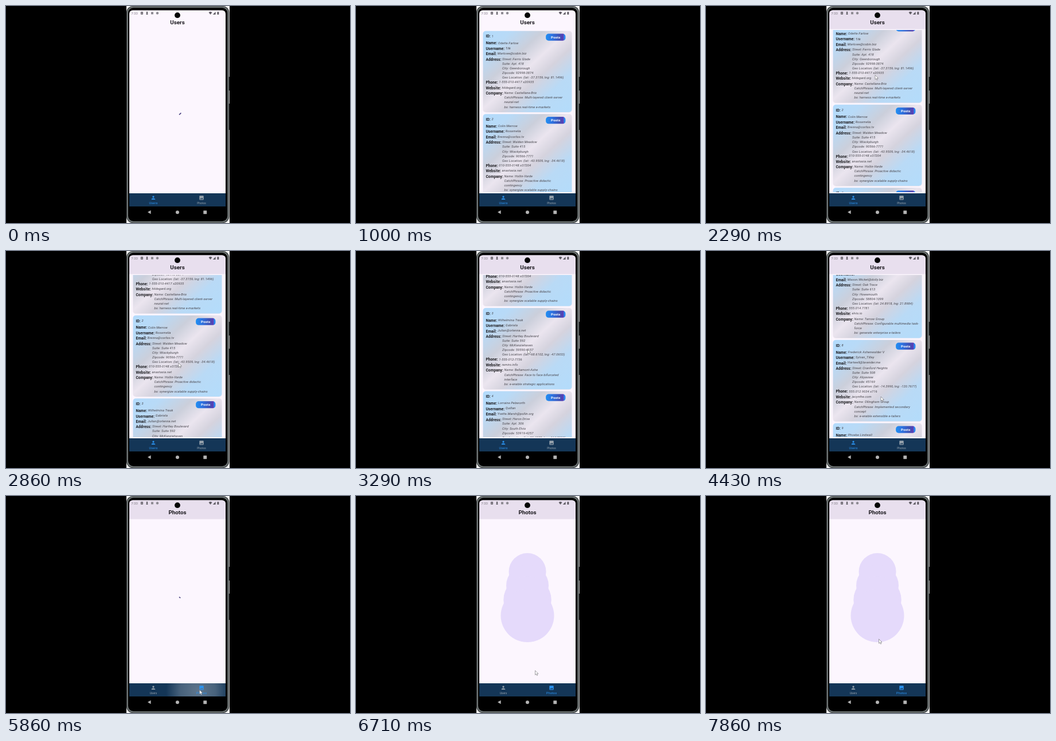
Animation, 600 px wide and 380 px high, one loop 8 s. Source, as an HTML page:

```html
<!DOCTYPE html>
<html lang="en">
<head>
<meta charset="utf-8">
<title>Users and photos</title>
<style>
  html, body { margin: 0; width: 100%; height: 100%; overflow: hidden; background: #000; }
  #stage { position: relative; width: 600px; height: 380px; overflow: hidden; background: #000;
    font-family: Roboto, "Open Sans", sans-serif; }
  svg { position: absolute; left: 0; top: 0; }
  .title { font-weight: 700; font-size: 9.8px; fill: #1a181d; text-anchor: middle; }
  .tab text { text-anchor: middle; letter-spacing: .05px; }
  #view { position: absolute; left: 215px; top: 42px; width: 168px; height: 284px; overflow: hidden; }
  /* The list is laid out in device pixels, then scaled down. */
  #list { position: absolute; left: 0; top: 0; width: 411px; transform-origin: 0 0; }
  .card { position: relative; box-sizing: border-box; height: 348.2px; margin: 4px 16px 8px; padding: 12px;
    border-radius: 12px; white-space: nowrap; color: #45434a; font-size: 14px; line-height: 20px;
    letter-spacing: .25px; box-shadow: 0 1px 3px rgba(0, 0, 0, .1);
    background: linear-gradient(to bottom right, #b3dbfc 0%, #b8daf7 16%, #cbcfdb 34%, #ebe5ef 48%,
      #d5d3de 60%, #b9daf6 76%, #b3dcfb 100%); }
  .row { display: flex; min-height: 23px; font-style: italic; }
  .row:first-child { height: 29.2px; }
  .row b { font-size: 16px; font-weight: 600; line-height: 23px; font-style: normal; color: #1c1b1f; margin-right: 4px; }
  .row span { margin-top: -.5px; }
  .posts { position: absolute; right: 27px; top: 12px; width: 84px; height: 30px; border-radius: 12px;
    color: #fff; font-size: 15px; font-weight: 600; line-height: 30px; text-align: center;
    background: linear-gradient(90deg, #2190f2 0%, #2d74e2 30%, #3f51b5 70%, #5f3db4 90%, #2b88f0 92%); }
</style>
</head>
<body>
<div id="stage">
  <svg width="600" height="380" viewBox="0 0 600 380">
    <defs>
      <clipPath id="screen"><path d="M215 351V13.500a6 6 0 0 1 6-6H377a6 6 0 0 1 6 6V351Z"/></clipPath>
      <clipPath id="bar"><rect x="215" y="328" width="168" height="23"/></clipPath>
      <radialGradient id="glow">
        <stop offset="0" stop-color="#fff" stop-opacity=".32"/>
        <stop offset=".55" stop-color="#fff" stop-opacity=".22"/>
        <stop offset="1" stop-color="#fff" stop-opacity="0"/>
      </radialGradient>
    </defs>

    <rect x="210" width="180" height="380" fill="#f4f4f4"/>
    <path d="M388 124h2v24h-2zM388 171h2v46h-2z" fill="#1b1d1e"/>
    <rect x="210" y="0" width="179.300" height="380" rx="11.500" fill="#3a3e3f"/>
    <rect x="211.900" y="1.900" width="175.400" height="376.200" rx="10.500" fill="#000" stroke="#6c7272" stroke-width="2.200"/>

    <g clip-path="url(#screen)">
      <rect x="215" y="7" width="168" height="344" fill="#fcf6fe"/>
      <rect id="head" x="215" y="7" width="168" height="33.500" fill="#e8dfee"/>
    </g>
    <circle cx="299" cy="16.200" r="4.900" fill="#050505"/>
    <text id="title" class="title" x="299" y="32"></text>

    <text x="218.500" y="14.700" font-size="5.800" fill="#77737c">7:33</text>
    <g fill="#5d5a62">
      <path d="M235 10.300h4v4.400h-4zM236.300 11.700v1.600h1.400v-1.600z" fill-rule="evenodd"/>
      <path d="M244.800 10h2.400v2h-.5v1h.7v2h-2.800v-2h.7v-1h-.5z"/>
      <rect x="253" y="10.500" width="4" height="4" fill="#8b8890"/>
      <circle cx="264" cy="12.500" r="2.200" fill="#8b8890"/>
      <path d="M353.600 11.200Q356.500 8.900 359.400 11.200L356.500 15ZM360.800 15H365.600V10.100ZM368.400 10.600h.7v-.7h1.500v.7h.7v4.400h-2.900z"/>
    </g>

    <path id="spin" fill="none" stroke="#493f80" stroke-width="1.640"/>
    <g id="blob" fill="#e5dafb">
      <circle cx="299" cy="132.500" r="32.500"/>
      <circle cx="299" cy="157" r="37"/>
      <circle cx="299" cy="182" r="41.700"/>
      <circle cx="299" cy="209.500" r="46.500"/>
    </g>

    <rect x="215" y="328" width="168" height="23" fill="#143657"/>
    <g clip-path="url(#bar)"><circle id="ripple" cx="335" cy="342" fill="url(#glow)"/></g>
    <g class="tab" id="usersTab">
      <path transform="translate(252.100 330.900) scale(.409)" d="M12 12a4 4 0 1 0 0-8 4 4 0 0 0 0 8zm0 2c-2.670 0-8 1.340-8 4v2h16v-2c0-2.660-5.330-4-8-4z"/>
      <text x="257" y="346.500">Users</text>
    </g>
    <g class="tab" id="photosTab">
      <path transform="translate(336.100 330.900) scale(.409)" d="M21 19V5c0-1.100-.9-2-2-2H5c-1.100 0-2 .9-2 2v14c0 1.100.9 2 2 2h14c1.100 0 2-.9 2-2zM8.500 13.500l2.500 3 3.500-4.500 4.500 6H5z"/>
      <text x="341" y="346.500">Photos</text>
    </g>
    <g fill="#b4b4b4">
      <path d="M247 361l5.600-3.300v6.600z"/>
      <circle cx="299" cy="361.200" r="3"/>
      <rect x="344.300" y="358.300" width="5.900" height="5.900" rx=".5"/>
    </g>
  </svg>

  <div id="view"><div id="list"></div></div>

  <svg width="600" height="380" viewBox="0 0 600 380">
    <path id="cursor" d="M0 0V7.600L1.800 6 3 8.700 4.300 8.100 3.100 5.500H5.500Z" fill="#fff" stroke="#66656b" stroke-width=".6"/>
  </svg>
</div>

<script>
const LOOP = 8000, FPS = 7, SCALE = 168 / 411;
const $ = id => document.getElementById(id);

// name; username; email; street; suite; city; zip; lat; lng; phone; site; company; phrase; bs
const users = `
Odette Farlow;Tilk;Marlowe@cobin.biz;Ferris Glade;Apt. 418;Gwenborough;92998-3874;-37.3159;81.1496;1-555-010-4417 x20935;hildegard.org;Castellane-Brix;Multi-layered client-server|neural-net;harness real-time e-markets
Colin Merrow;Rosamelia;Brenna@corliss.tv;Walden Meadow;Suite 415;Wisokyburgh;90566-7771;-43.9509;-34.4618;010-555-0148 x37204;anastasia.net;Hollin-Varde;Proactive didactic|contingency;synergize scalable supply-chains
Wilhelmina Trask;Gabriela;Julian@orlenna.net;Hartley Boulevard;Suite 592;McKenziehaven;59590-4157;-68.6102;-47.0653;1-555-012-7736;ramiro.info;Bellamont-Ashe;Face to face bifurcated|interface;e-enable strategic applications
Lorraine Pebworth;Quillan;Yvette.Marsh@pollin.org;Heron Drive;Apt. 306;South Elvis;53919-4257;29.4572;-164.2990;555-014-9920 x118;kale.biz;Marsden-Cole;Multi-tiered zero tolerance|productivity;transition cutting-edge web services
Meredith Hansell;Torvin;Basil_Winterton@coral.ca;Alder Bridge;Suite 264;Roscoeview;33263;-31.8129;62.5342;(555)010-3862;demarco.info;Wendlow LLC;User-centric fault-tolerant|solution;revolutionize end-to-end systems
Mrs. Martin Colbrook;Fernando_Whitlow;Sidney_Holt@marble.info;Bartram Crossing;Apt. 721;South Christy;23505-1337;-71.4197;71.7478;1-555-013-2290 x5817;ola.org;Pemberly-Strander;Synchronised bottom-line|interface;e-enable innovative applications
Gordon Ellwicke;Alden.Porter;Mason.Wicket@dolly.biz;Oak Trace;Suite 613;Howemouth;58804-1099;24.8918;21.8984;555.014.7781;elvis.io;Tarrow Group;Configurable multimedia task-|force;generate enterprise e-tailers
Frederick Ashenwalder V;Sylvan_Tilley;Hartwell@lavender.me;Cranford Heights;Suite 508;Aliyaview;45169;-14.3990;-120.7677;555.012.9034 x716;jacynthe.com;Ollingham Group;Implemented secondary|concept;e-enable extensible e-tailers
Phoebe Lindwall;Stanmore;Corin_Oakes@melba.io;Willow Park;Suite 197;Bartholomebury;76495-3109;24.6463;-168.8889;(555)011-6208 x4135;conrad.com;Hadley and Sons;Switchable contextually-based|project;aggregate real-time technologies
Clarissa Dunmore;Merrick.Vale;Ansel.Brook@tully.biz;Linden Square;Suite 830;Lebsackbury;31428-2261;-38.2386;57.2232;555-016-3804;ambrose.net;Fairholm LLC;Centralized empowering|task-force;target end-to-end models
`.trim().split("\n").map(line => line.split(";"));

const row = (label, ...lines) => `<div class="row"><b>${label}:</b><span>${lines.join("<br>")}</span></div>`;

$("list").innerHTML = users.map(([name, nick, mail, street, suite, city, zip, lat, lng, phone, site, firm, phrase, bs], i) =>
  `<div class="card">${row("ID", i + 1)}${row("Name", name)}${row("Username", nick)}${row("Email", mail)}` +
  row("Address", `Street: ${street}`, `Suite: ${suite}`, `City: ${city}`, `Zipcode: ${zip}`,
    `Geo Location: (lat: ${lat}, lng: ${lng})`) +
  row("Phone", phone) + row("Website", site) +
  row("Company", `Name: ${firm}`, `CatchPhrase: ${phrase.replace("|", "<br>")}`, `bs: ${bs}`) +
  `<div class="posts">Posts</div></div>`).join("");

// Keys are [step, value...], seven steps per second.
const scrollKeys = [[14, 0], [15, 6], [16, 16.4], [17, 42], [18, 60], [19, 70], [20, 76.5], [22, 185], [23, 235],
  [25, 420], [26, 505], [27, 597.8], [29, 785], [30, 855], [31, 907], [33, 1080], [34, 1132], [36, 1172]];
const cursorKeys = [[11, 297, 215], [14, 296, 143], [16, 295, 121], [18, 299, 215], [20, 301, 196], [22, 299, 110],
  [24, 300, 235], [25, 298, 130], [26, 296, 225], [27, 293, 170.5], [28, 291, 110], [30, 306, 262], [31, 305, 255],
  [33, 303, 130], [35, 306, 235], [38, 325, 310], [40, 337.5, 339.5], [43, 337.5, 339.5], [46, 318, 310],
  [49, 301.5, 297], [52, 301.5, 297], [53, 301.5, 285], [54, 301.5, 265], [55, 301.5, 250.5]];

function sample(keys, k) {
  const n = keys.findIndex(key => key[0] > k);
  if (n === 0) return keys[0].slice(1);
  if (n < 0) return keys[keys.length - 1].slice(1);
  const a = keys[n - 1], b = keys[n], u = (k - a[0]) / (b[0] - a[0]);
  return a.slice(1).map((v, i) => v + (b[i + 1] - v) * u);
}

const clamp = v => Math.max(0, Math.min(1, v));
const show = (id, on) => { $(id).style.display = on ? "" : "none"; };

function arc(from, sweep) {
  const point = deg => {
    const a = deg * Math.PI / 180;
    return `${299 + 7.2 * Math.cos(a)} ${183.6 + 7.2 * Math.sin(a)}`;
  };
  $("spin").setAttribute("d", `M${point(from)}A7.2 7.2 0 ${sweep > 180 ? 1 : 0} 1 ${point(from + sweep)}`);
}

function paintTab(id, active) {
  $(id).setAttribute("fill", active ? "#2b93f0" : "#98a4ae");
  $(id).lastElementChild.setAttribute("font-size", active ? 5.72 : 4.9);
}

const SWITCH = 41, LOADED = 46;

function render(now) {
  const k = Math.floor((now % LOOP + 5) * FPS / 1000) % (LOOP * FPS / 1000);
  const photos = k >= SWITCH;
  const [scroll] = sample(scrollKeys, k);
  const [x, y] = sample(cursorKeys, k);

  $("title").textContent = photos ? "Photos" : "Users";
  $("head").setAttribute("opacity", clamp(scroll / 12));
  $("list").style.transform = `translateY(${-scroll}px) scale(${SCALE})`;
  show("view", k >= 5 && !photos);
  paintTab("usersTab", !photos);
  paintTab("photosTab", photos);

  show("spin", k < 5 || photos && k < LOADED);
  if (photos) {
    const n = k - SWITCH;
    arc(-66 + 7 * n + 3 * n * n, 22 + 50 * n);
  } else {
    const n = Math.min(k, 2);
    arc([30, 42, 90][n], [36, 72, 32][n]);
  }
  show("blob", k >= LOADED);

  const press = k - 40;
  show("ripple", press >= 0 && press < 4);
  $("ripple").setAttribute("r", Math.max(0, 22 + 34 * press));
  $("ripple").setAttribute("opacity", clamp(1.45 - .4 * press));

  show("cursor", k >= 11);
  $("cursor").setAttribute("transform", `translate(${x} ${y})`);
}

function tick(now) {
  render(now);
  requestAnimationFrame(tick);
}
render(0);
requestAnimationFrame(tick);
</script>
</body>
</html>
```
